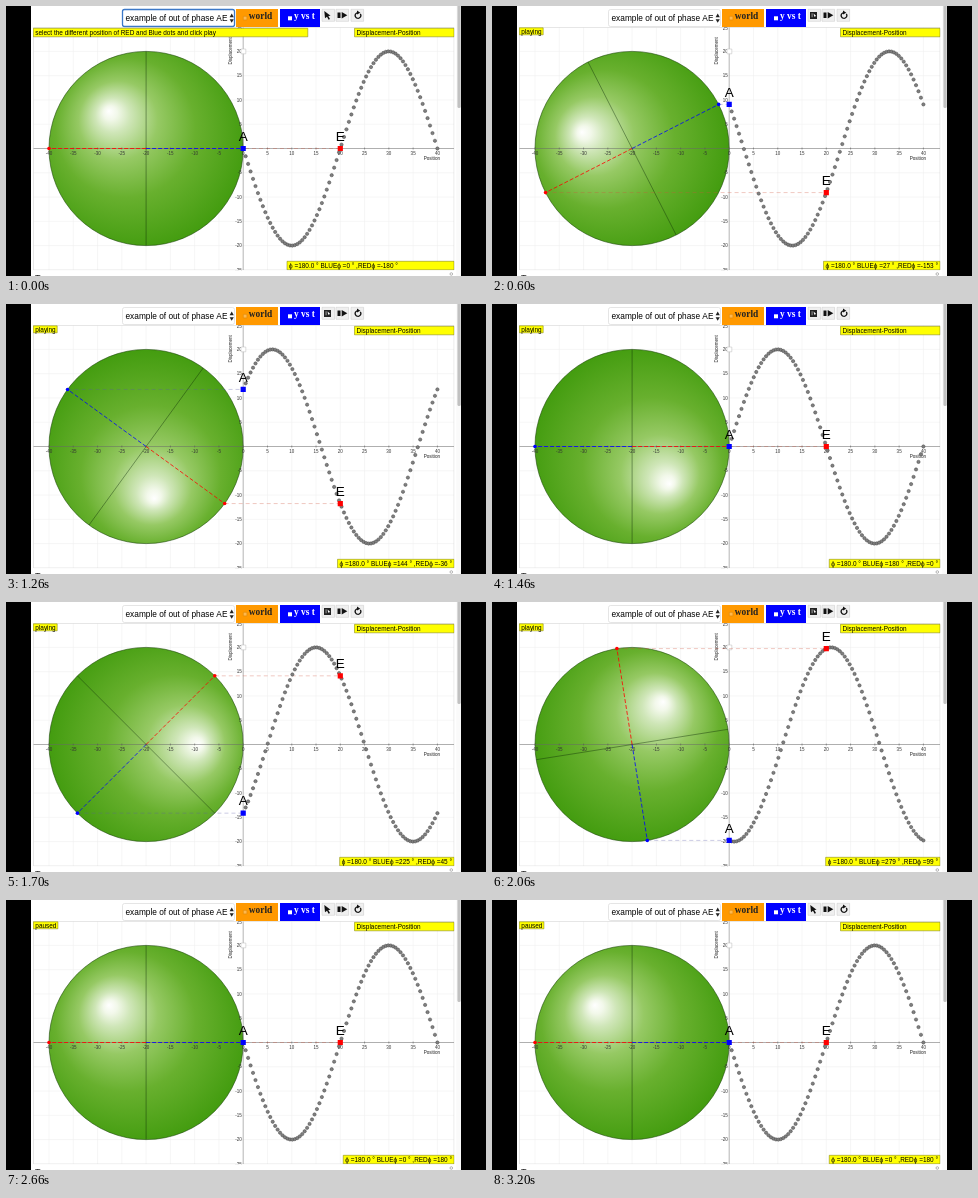
Animation, 480 px wide and 270 px high, one loop 3.23 s. Source, as an HTML page with a canvas:

```html
<!DOCTYPE html>
<html>
<head>
<meta charset="utf-8">
<style>
html, body { margin: 0; width: 100%; height: 100%; overflow: hidden; background: #000; }
canvas { display: block; width: 480px; height: 270px; }
</style>
</head>
<body>
<canvas id="stage"></canvas>
<script>
const LOOP = 3230, PLAY_AT = 398, STEP_MS = 52, STEPS = 40, STEP_DEG = 9;
const UNIT = 4.855, X0 = 237.2, Y0 = 142.5, R = 20 * UNIT, DOTS = 80;
const SANS = '"Liberation Sans", Arial, sans-serif';
const SERIF = '"Liberation Serif", Times, serif';
const RED = '#f00', BLUE = '#00f';

const canvas = document.getElementById('stage');
const dpr = window.devicePixelRatio || 1;
canvas.width = 480 * dpr;
canvas.height = 270 * dpr;
const c = canvas.getContext('2d');
c.scale(dpr, dpr);

const px = x => X0 + x * UNIT;
const py = y => Y0 - y * UNIT;

function paint(fill, stroke, width) {
  if (fill) { c.fillStyle = fill; c.fill(); }
  if (stroke) { c.strokeStyle = stroke; c.lineWidth = width; c.stroke(); }
}

function rect(x, y, w, h, fill, stroke, width = 0.5) {
  c.beginPath();
  c.rect(x, y, w, h);
  paint(fill, stroke, width);
}

function disc(x, y, r, fill, stroke, width = 0.5) {
  c.beginPath();
  c.arc(x, y, r, 0, 7);
  paint(fill, stroke, width);
}

function poly(fill, ...p) {
  c.beginPath();
  for (let i = 0; i < p.length; i += 2) c.lineTo(p[i], p[i + 1]);
  c.closePath();
  paint(fill);
}

function line(x1, y1, x2, y2, color, width = 0.5, dash = []) {
  c.beginPath();
  c.moveTo(x1, y1);
  c.lineTo(x2, y2);
  c.setLineDash(dash);
  paint(null, color, width);
  c.setLineDash([]);
}

function text(s, x, y, size, align = 'left', color = '#000', family = SANS, weight = '') {
  c.font = `${weight} ${size}px ${family}`;
  c.textAlign = align;
  c.fillStyle = color;
  c.fillText(s, x, y);
}

function textWidth(s, size) {
  c.font = `${size}px ${SANS}`;
  return c.measureText(s).width;
}

function note(s, x, y, w, h) {
  rect(x, y, w, h, '#ff0', '#77770a');
  text(s, x + 2, y + h / 2 + 2.4, 6.45);
}

function drawToolbar(state) {
  const ready = state === 'ready';
  c.beginPath();
  c.roundRect(116.5, 3.5, 112, 17, 2);
  paint('#fff', ready ? '#3b78c8' : '#d4d4d4', ready ? 1.3 : 0.6);
  text('example of out of phase AE', 119.5, 15.3, 8.3);
  poly('#222', 223.6, 11.2, 225.7, 7.6, 227.8, 11.2);
  poly('#222', 223.6, 13.2, 225.7, 16.8, 227.8, 13.2);

  rect(230, 3, 42, 18, '#f90');
  rect(237.3, 10.3, 3.6, 3.6, '#ffb84d', '#d98200');
  text('world', 242.8, 13.4, 9.4, 'left', '#222', SERIF, 'bold');
  rect(274, 3, 40, 18, '#00f');
  rect(282, 10.3, 4, 4, '#fff');
  text('y vs t', 288, 13.4, 9.4, 'left', '#fff', SERIF, 'bold');

  for (const x of [316, 330, 345]) rect(x, 3.3, 12.6, 12, '#efefef', '#c8c8c8');
  if (state === 'playing') {
    rect(318, 6, 7, 7, '#222');
    rect(319.5, 7.3, 1.2, 4, '#888');
    poly('#fff', 321.6, 7.6, 324.2, 10, 322.2, 10.8);
  } else {
    poly('#111', 318.3, 5, 324.6, 9.7, 322.3, 10.1, 324, 13, 322.6, 13.7, 321, 10.7, 319, 12.2);
  }
  rect(331.5, 6.5, 3, 5.5, '#111');
  poly('#111', 335.7, 6, 341.3, 9.2, 335.7, 12.4);
  c.beginPath();
  c.arc(352, 9.5, 2.8, -0.6, 4.4);
  paint(null, '#111', 1.2);
  poly('#111', 351, 4.6, 354.3, 6.8, 351, 8.6);
}

function drawGrid() {
  for (let v = -40; v <= 40; v += 5) line(px(v), 21.5, px(v), 264, '#ececec');
  for (let v = -20; v <= 20; v += 5) line(27.5, py(v), 448, py(v), '#ececec');
  rect(27.5, 21.5, 420.5, 242.5, null, '#ccc');
}

function drawAxes() {
  line(27.5, Y0, 448, Y0, '#666');
  line(X0, 21.5, X0, 264, '#777');
  for (let v = -40; v <= 40; v += 5) {
    line(px(v), Y0 - 1, px(v), Y0 + 1, '#555');
    text(v, px(v), 148.5, 4.5, 'center', '#333');
  }
  for (let v = -25; v <= 25; v += 5) {
    if (v) text(v, 235.8, py(v) + (v === 25 ? 3 : 1.7), 4.5, 'right', '#333');
  }
  text('Position', 434, 154, 4.6, 'right', '#222');
  c.save();
  c.translate(226, 58.5);
  c.rotate(-Math.PI / 2);
  text('Displacement', 0, 0, 4.5, 'left', '#222');
  c.restore();
  rect(235, 43, 4.8, 4.8, '#fff', '#bbb');
}

// The highlight turns with the ball; the shade darkens towards the rim.
function drawBall(a) {
  const cx = px(-20), light = a + 0.75 * Math.PI;
  const dx = 53 * Math.cos(light), dy = -53 * Math.sin(light);
  const g = c.createRadialGradient(cx + dx, Y0 + dy, 0, cx + dx / 4, Y0 + dy / 4, R * 1.2);
  g.addColorStop(0, '#fff');
  g.addColorStop(0.06, '#f2f8ea');
  g.addColorStop(0.15, '#cfe6b8');
  g.addColorStop(0.34, '#96c964');
  g.addColorStop(0.6, '#68b02e');
  g.addColorStop(1, '#3f9a0c');
  disc(cx, Y0, R, g, '#1f4a0c', 0.6);
}

function drawSpokes(a) {
  const cx = px(-20), dx = R * Math.cos(a), dy = R * Math.sin(a);
  line(cx - dy, Y0 - dx, cx + dy, Y0 + dx, 'rgba(10,40,5,.75)', 0.55);
  line(cx + dx, Y0 - dy, X0, Y0 - dy, 'rgba(90,90,170,.45)', 0.7, [4, 3]);
  line(cx - dx, Y0 + dy, px(20), Y0 + dy, 'rgba(205,80,60,.45)', 0.7, [4, 3]);
  line(cx, Y0, cx + dx, Y0 - dy, BLUE, 0.8, [4, 2]);
  line(cx, Y0, cx - dx, Y0 + dy, RED, 0.8, [4, 2]);
  disc(cx + dx, Y0 - dy, 1.8, BLUE);
  disc(cx - dx, Y0 + dy, 1.8, RED);
}

function drawWave(a) {
  const y = x => py(20 * Math.sin(a - x * Math.PI / 20));
  for (let i = 0; i < DOTS; i++) {
    const x = 40 * i / (DOTS - 1);
    disc(px(x), y(x), 1.65, '#808080', '#444');
  }
  for (const [name, x, color] of [['A', 0, BLUE], ['E', 20, RED]]) {
    rect(px(x) - 2.6, y(x) - 2.6, 5.2, 5.2, color);
    text(name, px(x), y(x) - 7.7, 13.5, 'center');
  }
}

function drawNotes(state, blue, red) {
  if (state === 'ready') {
    note('select the different position of RED and Blue dots and click play', 27.3, 22.3, 274.5, 8.5);
  } else {
    note(state, 27.3, 21.8, textWidth(state, 6.45) + 3.5, 7);
  }
  note('Displacement-Position', 348.5, 22.3, 99.5, 8.5);
  const phase = `ϕ =180.0 ° BLUEϕ =${blue} ° ,REDϕ =${red} °`;
  const w = state === 'ready' ? 167 : textWidth(phase, 6.45) + 4;
  note(phase, 448 - w, 255.3, w, 8.5);
}

function drawPage() {
  rect(0, 0, 480, 270, '#000');
  rect(25, 0, 430, 270, '#fff');
  rect(450.3, 0, 4.7, 270, '#fafafa');
  c.beginPath();
  c.roundRect(451.4, -4, 3.3, 106, 1.6);
  paint('#c1c1c1');
  text('Trans', 29, 275, 9, 'left', '#222');
  disc(445.3, 268, 1.3, null, '#888', 0.6);
}

function draw(t) {
  const k = Math.max(0, Math.min(STEPS, Math.floor((t - PLAY_AT) / STEP_MS)));
  const state = t < PLAY_AT ? 'ready' : k < STEPS ? 'playing' : 'paused';
  const blue = k * STEP_DEG % 360;
  const red = k === STEPS ? 180 : blue - 180;
  const a = blue * Math.PI / 180;
  drawPage();
  drawToolbar(state);
  c.save();
  c.beginPath();
  c.rect(27, 21, 421.5, 243.3);
  c.clip();
  drawGrid();
  drawBall(a);
  drawAxes();
  drawSpokes(a);
  drawWave(a);
  drawNotes(state, blue, red);
  c.restore();
}

const start = performance.now();
function tick() {
  draw((performance.now() - start) % LOOP);
  requestAnimationFrame(tick);
}
tick();
</script>
</body>
</html>
```
